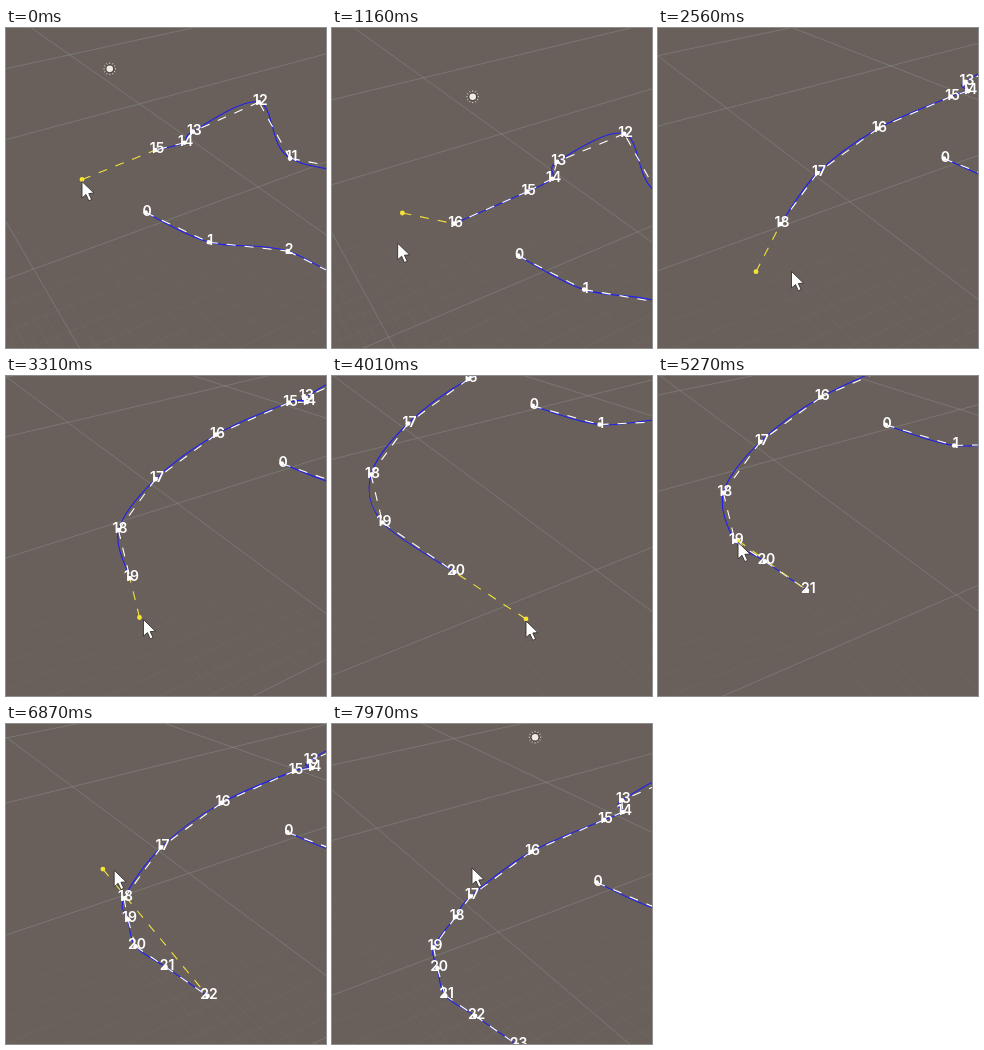
Recreate the animation shown at these times as an HTML page with a canvas. Size 320 by 320 pixels, loop 8000 ms.

```html
<!DOCTYPE html>
<html lang="en">
<head>
<meta charset="utf-8">
<title>Spline editing</title>
<style>
  html, body { margin: 0; width: 100%; height: 100%; overflow: hidden; background: #69605b; }
  canvas { display: block; width: 100vw; height: 100vh; }
</style>
</head>
<body>
<canvas id="stage"></canvas>
<script>
const SIZE = 320, LOOP = 8000, HOLD = 200, HOVER_LAG = 100;
const FOCUS = { x: 124, y: 194 }, FIRST_PAN = { x: -46, y: -42 };
const canvas = document.getElementById('stage');
const ctx = canvas.getContext('2d');

const mix = (a, b, u) => a + (b - a) * u;
const mixPoint = (a, b, u) => ({ x: mix(a.x, b.x, u), y: mix(a.y, b.y, u) });
const clamp = u => Math.max(0, Math.min(1, u));
const easeOut = u => 1 - (1 - u) ** 4;
const smooth = u => u * u * (3 - 2 * u);
const node = (x, y, depth = 1) => ({ x, y, depth });

// The far part of the curve is an arc that turns back outside the view
const farArc = Array.from({ length: 8 }, (_, i) => {
  const u = i / 7;
  return node(425 + 150 * Math.sin(Math.PI * u), 320 - 138 * u, mix(1.2, .9, u));
});
const startNodes = [
  node(188, 226, 1.02), node(254, 260, 1.08), node(336, 274, 1.15), ...farArc,
  node(327, 163, .9), node(294, 104, .86), node(227, 132, .84), node(222, 149, .92), node(197, 162)
];
const light = node(141, 69, .81);

// Every click adds a node at a slot of the curve, then the camera centres on it.
// travel: time the pointer takes to get there; settle: length of the camera move
const edits = [
  { at: 670, slot: 16, node: node(124, 194), travel: 0, settle: 700 },
  { at: 1570, slot: 17, node: node(63.5, 238.5), travel: 450, settle: 490 },
  { at: 2210, slot: 18, node: node(26.5, 289.5), travel: 300, settle: 400 },
  { at: 3030, slot: 19, node: node(38, 337.5), travel: 150, settle: 700 },
  { at: 3820, slot: 20, node: node(110, 387), travel: 520, settle: 200 },
  { at: 5030, slot: 20, node: node(68, 358), travel: 800, settle: 1100 },
  { at: 6360, slot: 19, node: node(30.5, 310.5), travel: 800, settle: 770 },
  { at: 7740, slot: 18, node: node(48.5, 259), travel: 690, settle: 460 }
];
let lastPan = FIRST_PAN, nodeCount = startNodes.length;
for (const edit of edits) {
  edit.click = { x: edit.node.x + lastPan.x - 2, y: edit.node.y + lastPan.y + 1.5 };
  edit.pan = { x: FOCUS.x - edit.node.x, y: FOCUS.y - edit.node.y };
  edit.onCurve = edit.slot < nodeCount++;
  lastPan = edit.pan;
}

const panAt = t => edits.reduce(
  (pan, e) => mixPoint(pan, e.pan, easeOut(clamp((t - e.at) / e.settle))), FIRST_PAN);

function glide(t, i) {
  return smooth(clamp((t - edits[i - 1].at - HOLD) / edits[i].travel));
}

function pointerAt(t) {
  let position = edits[0].click;
  for (let i = 1; i < edits.length; i++) position = mixPoint(position, edits[i].click, glide(t, i));
  return position;
}

function nodesAt(t) {
  const nodes = [...startNodes];
  for (const e of edits) if (t >= e.at) nodes.splice(e.slot, 0, e.node);
  return nodes;
}

// No preview while the pointer rests on the curve
function previewShown(t) {
  const next = edits.findIndex(e => t < e.at);
  if (next < 0) return false;
  return !(edits[next].onCurve && glide(t, next) === 1);
}

function project(p, pan) {
  const lift = .35 * (1 - p.depth) * (pan.x + pan.y);
  return { x: p.x + pan.x * p.depth, y: p.y + pan.y * p.depth - lift };
}

function strokeLines(color, width, dash, build) {
  ctx.beginPath();
  build();
  ctx.strokeStyle = color;
  ctx.lineWidth = width;
  ctx.setLineDash(dash);
  ctx.stroke();
  ctx.setLineDash([]);
}

function segment(a, b) {
  ctx.moveTo(a.x, a.y);
  ctx.lineTo(b.x, b.y);
}

function disc({ x, y }, r, color) {
  ctx.beginPath();
  ctx.arc(x, y, r, 0, 7);
  ctx.fillStyle = color;
  ctx.fill();
}

// Grid lines are [height at the left edge, slope]
function drawGrid({ x, y }) {
  const across = h => [h, -(.19 + .0007 * h)];
  const q = y + .33 * x, d = y - .72 * x;
  const rows = [
    across(72 + .6 * (y + .22 * x)),
    across(157 + .84 * (y + .26 * x)),
    across(334 + 1.5 * q + .0009 * q * q),
    across(300 + 1.7 * (y + .4 * x + 187))
  ];
  const h = 205 + 1.3 * d + .0014 * d * d;
  const columns = [
    [-16 + .22 * d, .72 + .002 * d],
    [h, .74 + 1.1 * (Math.max(h, 0) / 205) ** 2]
  ];
  const ray = ([at, slope]) => segment({ x: 0, y: at }, { x: SIZE, y: at + slope * SIZE });
  const between = (a, b, u) => [mix(a[0], b[0], u), mix(a[1], b[1], u)];

  const fade = ctx.createLinearGradient(0, 120, 0, SIZE);
  fade.addColorStop(0, 'rgba(150,152,150,0)');
  fade.addColorStop(1, 'rgba(150,152,150,.08)');
  strokeLines(fade, 1, [], () => {
    for (let i = 1; i < 10; i++) {
      ray(between(rows[1], rows[2], i / 10));
      ray(between(rows[2], rows[3], i / 10));
    }
    for (let i = 1; i < 22; i++) if (i !== 10) ray(between(...columns, i / 10));
  });
  strokeLines('rgba(150,160,158,.34)', 1, [], () => [...rows, ...columns].forEach(ray));
}

function drawLight(center) {
  disc(center, 4.6, '#4d4944');
  disc(center, 3.3, '#f0ece3');
  strokeLines('#d8d3ca', 1, [], () => {
    for (let i = 0; i < 12; i++) {
      const c = Math.cos(i * Math.PI / 6), s = Math.sin(i * Math.PI / 6);
      const at = r => ({ x: center.x + r * c, y: center.y + r * s });
      segment(at(5), at(6.3));
    }
  });
}

// Catmull-Rom spline drawn as Bezier pieces, with its dashed chords on top
function drawCurve(dots) {
  strokeLines('#2020f0', 1.1, [], () => {
    ctx.moveTo(dots[0].x, dots[0].y);
    for (let i = 0; i < dots.length - 1; i++) {
      const b = dots[i], c = dots[i + 1];
      const a = dots[i - 1] || b, e = dots[i + 2] || c;
      ctx.bezierCurveTo(b.x + (c.x - a.x) / 6, b.y + (c.y - a.y) / 6,
        c.x - (e.x - b.x) / 6, c.y - (e.y - b.y) / 6, c.x, c.y);
    }
  });
  strokeLines('#fff', 1.1, [9, 9], () => {
    for (let i = 0; i < dots.length - 1; i++) segment(dots[i], dots[i + 1]);
  });
}

function drawPointer({ x, y }) {
  ctx.save();
  ctx.translate(x, y);
  const arrow = new Path2D('M0 0V16.5L4 13L6.8 19.3L9.6 18L6.8 12L12 11.6Z');
  ctx.fillStyle = '#fff';
  ctx.fill(arrow);
  ctx.strokeStyle = '#35322f';
  ctx.lineWidth = .9;
  ctx.stroke(arrow);
  ctx.restore();
}

function draw(t) {
  ctx.setTransform(canvas.width / SIZE, 0, 0, canvas.height / SIZE, 0, 0);
  ctx.fillStyle = '#69605b';
  ctx.fillRect(0, 0, SIZE, SIZE);

  const pan = panAt(t);
  const labels = nodesAt(t).map(p => project(p, pan));
  const dots = labels.map(p => ({ x: p.x - 1.5, y: p.y + 2 }));

  drawGrid(pan);
  drawLight(project(light, pan));
  drawCurve(dots);

  if (previewShown(t)) {
    const hover = pointerAt(t - HOVER_LAG);
    hover.y -= 2;
    strokeLines('#f0e23c', 1.1, [9, 9], () => segment(hover, dots[dots.length - 1]));
    disc(hover, 2.4, '#f5e431');
  }

  dots.forEach(p => disc(p, 2.3, '#fff'));
  ctx.font = '600 14px Inter, Roboto, sans-serif';
  ctx.textAlign = 'center';
  ctx.fillStyle = '#fff';
  labels.forEach((p, i) => ctx.fillText(i, p.x, p.y + 5));
  drawPointer(pointerAt(t));
}

function resize() {
  const ratio = window.devicePixelRatio || 1;
  canvas.width = Math.round(innerWidth * ratio) || SIZE;
  canvas.height = Math.round(innerHeight * ratio) || SIZE;
}

const began = performance.now();
function frame() {
  draw((performance.now() - began) % LOOP);
  requestAnimationFrame(frame);
}
addEventListener('resize', resize);
resize();
frame();
</script>
</body>
</html>
```
